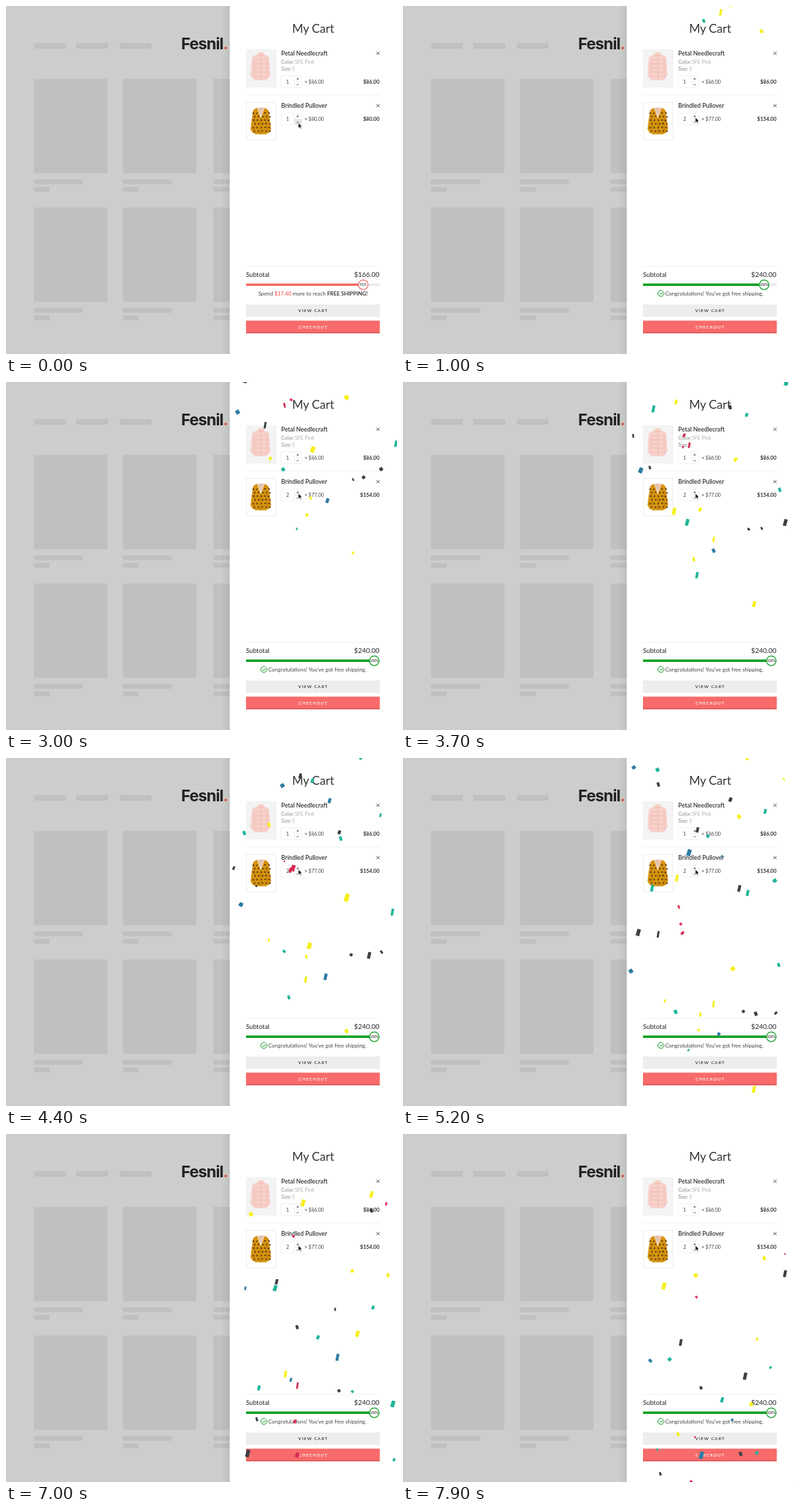
Animation of 567 by 506 pixels, one loop 8 s. Source, as an HTML page with a canvas:

```html
<!DOCTYPE html>
<html lang="en">
<head>
<meta charset="utf-8">
<title>Cart with confetti</title>
<style>
  html, body { margin: 0; width: 100%; height: 100%; overflow: hidden; }
  svg, canvas { position: absolute; left: 0; top: 0; width: 567px; height: 506px; }
  text { font-family: Lato, "Open Sans", sans-serif; fill: #333; }
  .brand { font: 700 23px Inter, sans-serif; letter-spacing: -.9px; }
  .name { font-size: 8.8px; font-weight: 600; }
  .meta { font-size: 7.3px; fill: #8a8a8a; }
  .pale { fill: #b0b0b0; }
  .small { font-size: 7px; fill: #444; }
  .price { font-size: 7.5px; font-weight: 700; text-anchor: end; }
  .note { font-size: 7.85px; fill: #444; text-anchor: middle; }
  .button { font-size: 6.2px; font-weight: 600; letter-spacing: 1.1px; text-anchor: middle; }
  .mid { text-anchor: middle; }
</style>
</head>
<body>
<svg viewBox="0 0 567 506">
  <defs>
    <linearGradient id="edge"><stop stop-color="#000" stop-opacity="0"/><stop offset="1" stop-color="#000" stop-opacity=".07"/></linearGradient>
    <g id="card" fill="#c0c0c0">
      <path d="M0 0h106.5v137H0z"/>
      <rect y="146" width="71" height="7" rx="1"/>
      <rect y="157" width="23" height="7" rx="1"/>
    </g>
    <g id="stepper" fill="none" stroke="#eee" stroke-width=".8">
      <path d="M0 0h30v17H0zM19 0v17M19 8.5h11"/>
      <path d="M22.3 4.5h3.4M24 2.8v3.4M22.3 13h3.4" stroke="#555"/>
    </g>
    <path id="close" d="M-2.2-2.2l4.4 4.4M2.2-2.2l-4.4 4.4" stroke="#333" stroke-width=".9"/>
  </defs>
  <path fill="#cdcdcd" d="M0 0h567v506H0z"/>
  <g fill="#c0c0c0">
    <rect x="41" y="54" width="46" height="8" rx="1"/>
    <rect x="102" y="54" width="46" height="8" rx="1"/>
    <rect x="165" y="54" width="46" height="8" rx="1"/>
  </g>
  <use href="#card" x="40.5" y="106"/><use href="#card" x="169.5" y="106"/><use href="#card" x="301" y="106"/>
  <use href="#card" x="40.5" y="293"/><use href="#card" x="169.5" y="293"/><use href="#card" x="301" y="293"/>
  <text class="brand" x="254" y="63" style="fill:#222">Fesnil<tspan fill="#e0564f">.</tspan></text>
  <path fill="url(#edge)" d="M312 0h13v506h-13z"/>
  <path fill="#fff" d="M324.5 0H567v506H324.5z"/>
  <text class="mid" x="445.5" y="38.5" font-size="17.2">My Cart</text>

  <g id="content">
    <path fill="#f4f4f4" stroke="#eee" stroke-width=".7" d="M348.5 63.5h43v54.5h-43z"/>
    <path fill="#f7d0ca" d="M364 71q1-4 5.500-4t5.500 4q5 1 6.500 4l2 26-4 5h-1l-1 2h-17l-1-2h-1l-4-5 2-26q1.500-3 7-4z"/>
    <path fill="none" stroke="#edb5ad" stroke-width=".7" d="M369.5 69v38M360 78h19M360 84h19M360 90h19M360 96h19M360 102h19M360 77v28M379 77v28M365 71q4 3 9 0"/>
    <path fill="#fff" stroke="#e9e9e9" stroke-width=".8" d="M348.500 140.500h43v54h-43z"/>
    <path fill="#d6930f" d="M364 148l5.500 15 5.500-15q5 2 6 5l3.500 26-3.500 6h-3v1.500h-17V185h-3l-3.500-6 3.500-26q1-3 6-5z"/>
    <path fill="#e6c4ae" d="M364.500 148.500q5-2 10 0l-5 12z"/>
    <path id="spots" fill="none" stroke="#4a3512" stroke-width="2.100" stroke-linecap="round"/>
    <path stroke="#a46c0b" stroke-width=".6" d="M369.500 163v23M360.500 162v23M378.500 162v23"/>

    <text class="name" x="399" y="71.500">Petal Needlecraft</text>
    <text class="meta" x="399" y="84">Color:<tspan class="pale" x="419">SFE Pink</tspan></text>
    <text class="meta" x="399" y="93.500">Size:<tspan class="pale" x="415">S</tspan></text>
    <use href="#stepper" x="399" y="101.500"/>
    <text class="small mid" x="408.500" y="112.800">1</text>
    <text class="small" x="433" y="112.800">× $86.00</text>
    <text class="price" x="541.500" y="112.500">$86.00</text>
    <use href="#close" x="539.500" y="68.700"/>
    <path stroke="#f3f3f3" d="M348 129.500h194M348 378.500h194"/>

    <text class="name" x="399" y="148.300">Brindled Pullover</text>
    <path id="hover" fill="#e6e6e6" d="M418 164.500h11v8h-11z"/>
    <use href="#stepper" x="399" y="156"/>
    <text class="small mid" x="408.500" y="167" id="quantity"></text>
    <text class="small" x="433" y="167" id="unit"></text>
    <text class="price" x="541.500" y="166.500" id="sum"></text>
    <use href="#close" x="539.500" y="145"/>

    <text x="348" y="394" font-size="9.300" font-weight="500">Subtotal</text>
    <text x="541.500" y="394" font-size="9.900" font-weight="500" text-anchor="end" id="total"></text>
    <rect x="348" y="403.500" width="194" height="3.600" rx="1" fill="#ebebeb"/>
    <rect x="348" y="403.500" height="3.600" rx="1" id="bar"/>
    <circle cy="405.300" r="7" fill="#fff" stroke-width="1.300" id="badge"/>
    <text class="mid" y="407" font-size="4.800" font-weight="600" id="percent"></text>
    <text class="note" x="445" y="420.700" id="spend">Spend <tspan fill="#f25c5c" font-weight="600">$17.40</tspan> more to reach <tspan fill="#222" font-weight="600">FREE SHIPPING!</tspan></text>
    <g id="congrats">
      <path fill="none" stroke="#0d9a24" d="M378.200 416.500a4.400 4.400 0 1 1-2-2.500M372 417.800l1.800 1.900 4-4.500"/>
      <text class="note" x="451.500" y="420.700">Congratulations! You've got free shipping.</text>
    </g>
    <path fill="#ededed" d="M348 434h194v18H348z"/>
    <text class="button" x="445.500" y="445.200">VIEW CART</text>
    <path fill="#f76b6a" d="M348 457.500h194V476H348z"/>
    <path fill="#d85d5c" d="M348 474.500h194V476H348z"/>
    <text class="button" x="445.500" y="468.800" style="fill:#fff">CHECKOUT</text>
  </g>
</svg>
<canvas id="confetti" width="567" height="506"></canvas>
<svg viewBox="0 0 567 506">
  <path id="cursor" fill="#000" stroke="#fff" stroke-width=".6" d="M0 0v7.500l1.700-1.500 1.200 2.800 1.300-.6-1.200-2.600h2.300z"/>
</svg>
<script>
const LOOP = 8000, UPDATE = 800;
const $ = id => document.getElementById(id);
const clamp = v => Math.max(0, Math.min(1, v));
const ease = v => (v = clamp(v), v * v * (3 - 2 * v));
const ctx = $('confetti').getContext('2d');

// Each piece: mean x, y at 4.4 s, fall speed in px/s.
const pieces = {
  '#f6f01c': [[387, 265, 110], [505, 397, 106], [431, 322, 92], [446, 289, 86], [438, 273, 125],
    [490, 203, 129], [393, 97, 97], [499, -6, 114], [557, -47, 97], [358, -185, 116],
    [503, -87, 110], [518, -180, 103], [419, -204, 117]],
  '#3f4044': [[523, 287, 106], [503, 286, 103], [549, 282, 111], [366, 186, 88], [338, 160, 117],
    [484, 108, 102], [382, -40, 98], [475, -26, 108], [425, 26, 98], [533, -154, 102]],
  '#1fb598': [[421, 348, 96], [407, 281, 110], [556, 224, 96], [444, 33, 101], [550, 83, 119],
    [357, 109, 100], [497, 117, 99], [524, 0, 97], [380, -75, 115]],
  '#2d7ba4': [[460, 318, 104], [342, 213, 121], [412, 40, 122], [468, 62, 101], [345, -80, 117]],
  '#d62b52': [[410, 150, 83], [411, 163, 98], [414, 160, 118], [543, -109, 81], [412, -106, 98]]
};

let seed = 11;
const random = () => (seed = seed * 16807 % 2147483647) / 2147483647;
const confetti = Object.entries(pieces).flatMap(([color, list]) =>
  list.map(([x, y, speed]) => ({ color, x, y, speed, spin: 3 + 3 * random(), phase: 6.28 * random() })));

let spots = '';
for (let i = 0; i < 30; i++) {
  const row = i / 5 | 0;
  const x = 358 + i % 5 * 5.6 + row % 2 * 2 + random(), y = 155 + row * 5.3 + random();
  if (Math.abs(x - 369.5) > (164 - y) * .4) spots += `M${x} ${y}h.3`;
}
$('spots').setAttribute('d', spots);

function drawConfetti(s) {
  ctx.clearRect(0, 0, 567, 506);
  ctx.save();
  ctx.beginPath();
  ctx.rect(324.5, 0, 243, 506);
  ctx.clip();
  const drift = 1.8 * (s - 4.8) ** 2 - 4;
  for (const p of confetti) {
    const y = p.y + p.speed * (s - 4.4);
    const size = (p.speed - 50) * .08;
    const tilt = 8 * Math.sin(p.spin * s + p.phase);
    const x = p.x + drift + tilt, length = tilt + size / 2;
    ctx.strokeStyle = p.color;
    ctx.lineWidth = size;
    ctx.beginPath();
    ctx.moveTo(x + size / 4, y - length / 2);
    ctx.lineTo(x - size / 4, y + length / 2);
    ctx.stroke();
  }
  ctx.restore();
}

function drawCart(t) {
  const done = t >= UPDATE;
  const fill = ease((t - UPDATE) / 500);
  const color = done ? '#0aa021' : '#f76b6a';
  const end = 518 + 16 * fill;
  $('content').style.opacity = 1 - .5 * ease((t - 250) / 150) + .5 * ease((t - UPDATE) / 200);
  $('hover').style.display = t < 100 ? '' : 'none';
  $('quantity').textContent = t < 200 ? 1 : 2;
  $('unit').textContent = done ? '× $77.00' : '× $80.00';
  $('sum').textContent = done ? '$154.00' : '$80.00';
  $('total').textContent = done ? '$240.00' : '$166.00';
  $('bar').setAttribute('width', end - 348);
  $('bar').setAttribute('fill', color);
  $('badge').setAttribute('cx', end);
  $('badge').setAttribute('stroke', color);
  $('percent').setAttribute('x', end);
  $('percent').textContent = done ? '100%' : '91%';
  $('spend').style.display = done ? 'none' : '';
  $('congrats').style.display = done ? '' : 'none';
  $('cursor').setAttribute('transform', `translate(424 ${170 - 8 * ease(t / 180)})`);
}

function frame(now) {
  const t = now % LOOP;
  drawCart(t);
  drawConfetti(t / 1000);
  requestAnimationFrame(frame);
}
requestAnimationFrame(frame);
</script>
</body>
</html>
```
